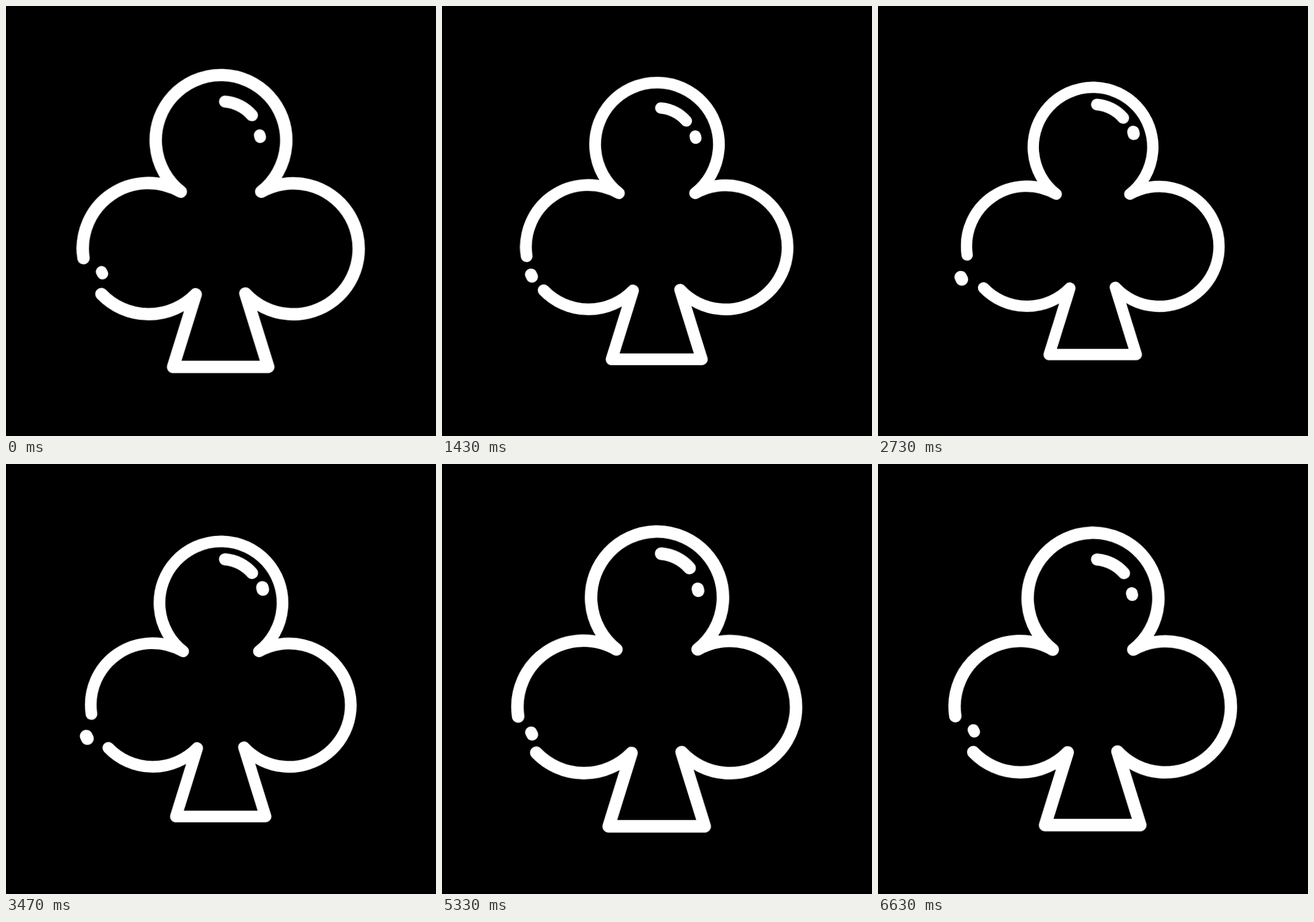
These frames come from a looping animation (748 px wide and 748 px high, 6.67 s). An HTML page:

```html
<!DOCTYPE html>
<html lang="en">
<head>
<meta charset="utf-8">
<title>Club</title>
<style>
  html, body { margin: 0; width: 100%; height: 100%; overflow: hidden; background: #000; }
  svg { display: block; width: 100%; height: 100%; }
  path { fill: none; stroke: #fff; stroke-width: 22.2; stroke-linecap: round; stroke-linejoin: round; }
</style>
</head>
<body>
<!-- Origin at the stage centre; every part pulses about it -->
<svg viewBox="-374 -374 748 748">
  <path d="M-246.2 66.4
           A117.2 117.2 0 0 1 -72 -52.5
           A116.9 116.9 0 1 1 72 -52.5
           A117.2 117.2 0 1 1 43.7 129.7
           L84.6 261.2 H-85.7 L-45.3 131.2
           A117.2 117.2 0 0 1 -214.1 130.7"/>
  <path d="M7.4 -220.4 A76.4 76.4 0 0 1 57.2 -195.2"/>
  <path d="M73.8 -163.6 L74.7 -159.7"/>
  <path d="M-235.4 99.8 L-233.3 103.9"/>
</svg>
<script>
  const HALF = 3335;      // ms from largest to smallest
  const SMALL = 0.75 / 0.85;
  const LEAD = 805;       // ms since the outline was largest

  // The parts share one linear pulse, each a quarter of a half-cycle apart.
  document.querySelectorAll('path').forEach((part, i) => {
    part.animate(
      { transform: ['scale(1)', `scale(${SMALL})`] },
      {
        duration: HALF,
        delay: -(LEAD + i * HALF / 4),
        direction: 'alternate',
        iterations: Infinity
      }
    );
  });
</script>
</body>
</html>
```
